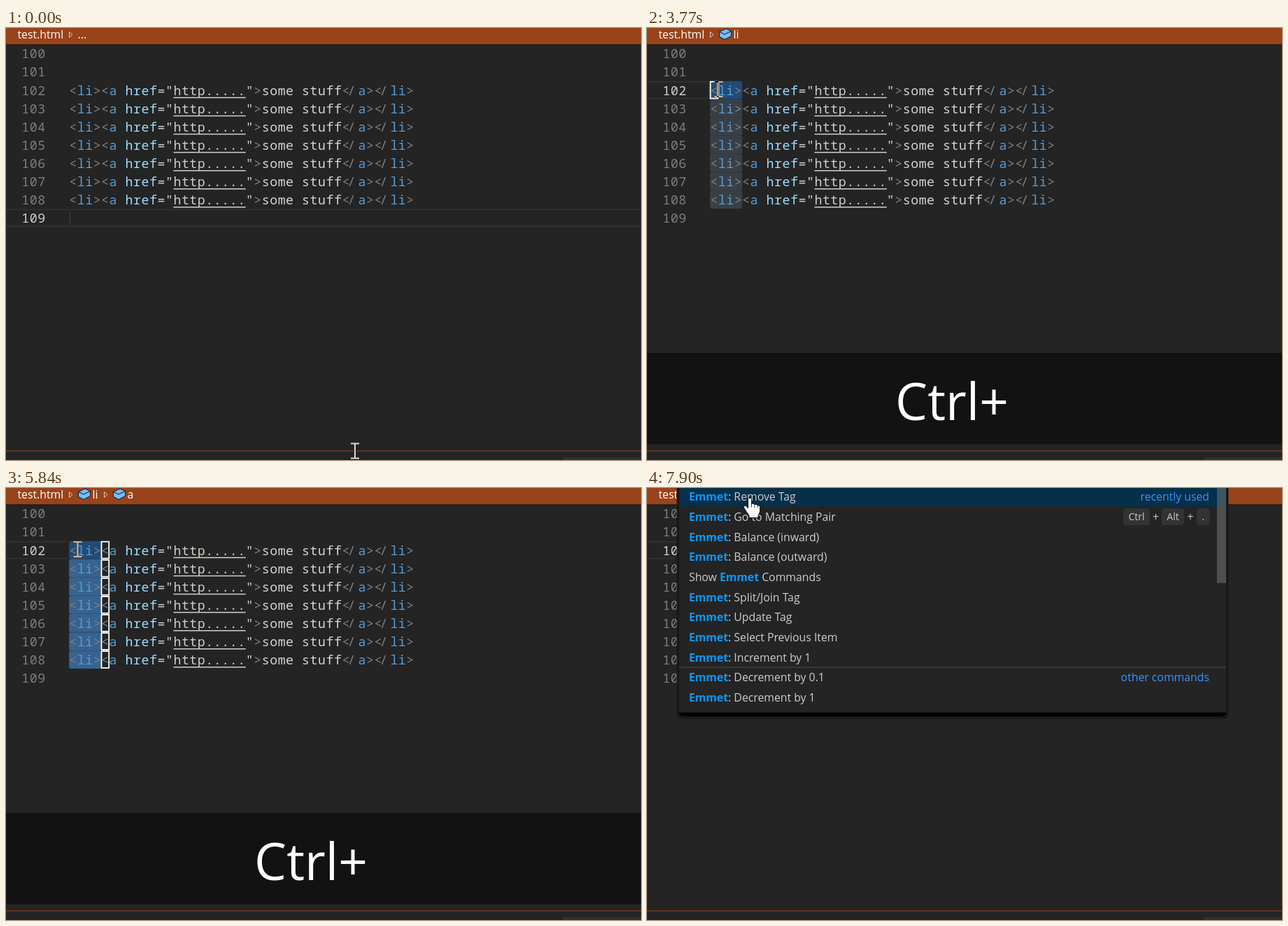
These frames come from a looping animation (908x617 px, 8000 ms). An HTML page:

```html
<!DOCTYPE html>
<html lang="en">
<head>
<meta charset="utf-8">
<title>Editor: multi-select and remove tag</title>
<style>
html, body { margin: 0; width: 100%; height: 100%; overflow: hidden; background: #242424; }
svg { display: block; width: 908px; height: 617px; }
text { white-space: pre; }
.ui { font: 15.8px "Open Sans", "Noto Sans", sans-serif; fill: #ccc; }
.ui .hit { font-weight: 700; fill: #0c97f8; }
.ui .note { fill: #3794ff; }
.crumb { fill: #fff; }
.code { font: 18.3px "Noto Sans Mono", "DejaVu Sans Mono", monospace; letter-spacing: .5px; }
.keys { font: 73px "Open Sans", "Noto Sans", sans-serif; fill: #fff; }
.cap { font-size: 14px; }
#beam { mix-blend-mode: difference; }
</style>
</head>
<body>
<svg id="stage" viewBox="0 0 908 617" xmlns="http://www.w3.org/2000/svg"></svg>
<script>
const LOOP = 8000, CW = 11.48, LH = 26.07, LEFT = 90.2;
const stage = document.getElementById('stage');

function add(tag, attrs, parent = stage, text) {
  const el = document.createElementNS('http://www.w3.org/2000/svg', tag);
  for (const k in attrs) el.setAttribute(k, attrs[k]);
  if (text !== undefined) el.textContent = text;
  parent.append(el);
  return el;
}
const group = (attrs = {}, parent) => add('g', attrs, parent);
const box = (x, y, width, height, fill, parent, more) =>
  add('rect', { x, y, width, height, fill, ...more }, parent);
const show = (el, on) => el.setAttribute('visibility', on ? 'visible' : 'hidden');
const rowY = n => 75.5 + LH * (n - 102);
const colX = c => LEFT + CW * c;

function cells(n, from, to, fill, parent) {
  box(colX(from), rowY(n) + .3, CW * (to - from), LH - .3, fill, parent, { rx: 2.5 });
}
function caret(n, col, parent) {
  box(colX(col) + .4, rowY(n) + 1.2, CW - .8, LH - 2.2, 'none', parent,
    { stroke: '#fff', 'stroke-width': 1.8 });
}
function lineBorder(n, width) {
  const g = group();
  box(0, rowY(n) + .4, width, 2, '#303030', g);
  box(0, rowY(n) + LH - 2, width, 2, '#303030', g);
  return g;
}

// ---- editor ----
box(0, 0, 908, 617, '#242424');
const fullLine = lineBorder(109, 908);
box(91, rowY(109) + 3, 1, LH - 5, '#404040', fullLine);
const clickLine = lineBorder(102, 908);
const gutterLine = lineBorder(102, 88);

const partSel = group(), fullSel = group(), multiSel = group();
const partHits = group(), fullHits = group();
for (let n = 102; n <= 108; n++) {
  const first = n === 102;
  cells(n, 1, 4, first ? '#214c76' : '#3a3f47', first ? partSel : partHits);
  cells(n, 40, 43, '#3a3f47', partHits);
  cells(n, 0, 4, first ? '#214c76' : '#3a3f47', first ? fullSel : fullHits);
  cells(n, 0, 4, first ? '#214c76' : '#38628f', multiSel);
}

const GRAY = '#808080', BLUE = '#569cd6', TEXT = '#d4d4d4';
// text, column, colour, x shift
const TOKENS = [
  ['<', 0, GRAY], ['li', 1, BLUE], ['>', 3, GRAY], ['<', 4, GRAY], ['a', 5, BLUE],
  ['href', 7, '#9cdcfe'], ['="', 11, TEXT], ['http.....', 13, '#ceccc4'], ['"', 22, TEXT],
  ['>', 23, GRAY], ['some stuff', 24, TEXT], ['<', 34, GRAY], ['/', 35, GRAY, -3.5],
  ['a', 36, BLUE], ['>', 37, GRAY], ['<', 38, GRAY], ['/', 39, GRAY, -3.5],
  ['li', 40, BLUE], ['>', 42, GRAY]
];
const nums = {};
for (let n = 100; n <= 109; n++) {
  const y = rowY(n) + 20;
  nums[n] = add('text', { x: 22.3, y, class: 'code' }, stage, n);
  if (n < 102 || n > 108) continue;
  for (const [s, col, fill, shift = 0] of TOKENS)
    add('text', { x: colX(col) + shift, y, fill, class: 'code' }, stage, s);
  box(colX(13), rowY(n) + 23.2, CW * 9, 1.5, '#d0d0cc');
}

const clickCaret = group(), partCaret = group(), fullCaret = group(), multiCaret = group();
caret(102, 4, clickCaret);
caret(102, 1, partCaret);
caret(102, 0, fullCaret);
for (let n = 102; n <= 108; n++) caret(n, 4, multiCaret);

// ---- breadcrumb bar ----
box(0, 23, 908, 2, '#1b1b1b');
box(0, 0, 908, 23.3, '#99431a');
const crumb = (x, s, parent) => add('text', { x, y: 15.3, class: 'ui crumb' }, parent, s);
const arrow = (x, parent) => add('path', {
  d: `M${x} 5.5l4.5 4-4.5 4z`, fill: 'none', stroke: '#e3cabd', 'stroke-width': 1
}, parent);
function cube(x, parent) {
  const g = group({ transform: `translate(${x} 0)`, 'stroke-linejoin': 'round' }, parent);
  add('path', { d: 'M.5 5.5L10 1l7.5 3.5v7L8 16.5.5 12.5z', fill: '#75beff', stroke: '#1d2c3a', 'stroke-width': 1.2 }, g);
  add('path', { d: 'M.5 5.5L8 9l9.5-4.5', fill: 'none', stroke: '#1d2c3a', 'stroke-width': 1.2 }, g);
}
crumb(16.5, 'test.html');
arrow(90.5);
const dots = crumb(102.5, '...');
const liCrumb = group(), aCrumb = group();
cube(103, liCrumb);
crumb(123.5, 'li', liCrumb);
arrow(140.5, aCrumb);
cube(153, aCrumb);
crumb(173.5, 'a', aCrumb);

// ---- panel edge ----
box(0, 603.3, 908, 1.4, '#7a3517');
box(796, 613, 112, 4, '#303030');

// ---- command palette ----
const ROW = 28.67, ROWS = [
  'Remove Tag', 'Go to Matching Pair', 'Balance (inward)', 'Balance (outward)', '',
  'Split/Join Tag', 'Update Tag', 'Select Previous Item', 'Increment by 1',
  'Decrement by 0.1', 'Decrement by 1'
];
const palette = group();
box(42.5, -12, 789, 342, '#181818', palette, { rx: 8 });
box(46, -12, 782, 338, '#000', palette, { rx: 5 });
box(46, 0, 782, 320.6, '#242424', palette);
box(46, 0, 782, 26.5, '#062f4a', palette);
const hover = box(46, 0, 769, ROW, '#000', palette);
box(46, 255.5, 782, 1.2, '#47474d', palette);
box(815, 0, 13, 135.7, '#797979', palette, { opacity: .5 });

const labels = ROWS.map((name, i) => {
  const t = add('text', { x: 60, y: 18.4 + ROW * i, class: 'ui' }, palette);
  const bit = (s, cls = '') => add('tspan', { class: cls }, t, s);
  if (!name) bit('Show ');
  bit('Emmet', 'hit');
  bit(name ? ': ' + name : ' Commands');
  return t;
});
function note(row, s) {
  const t = add('text', { x: 804, y: 18.4 + ROW * row, class: 'ui', 'text-anchor': 'end' }, palette);
  add('tspan', { class: 'note' }, t, s);
}
note(0, 'recently used');
note(9, 'other commands');

const mid = (x, y, s, cls, parent) =>
  add('text', { x, y, class: cls, 'text-anchor': 'middle' }, parent, s);
for (const [x, w, s] of [[681, 38, 'Ctrl'], [736, 32, 'Alt'], [786, 18.5, '.']]) {
  box(x, 29, w, 24, '#333', palette, { rx: 4 });
  mid(x + w / 2, 46, s, 'ui cap', palette);
}
mid(727.5, 47, '+', 'ui', palette);
mid(777, 47, '+', 'ui', palette);

// ---- key display ----
const keyBar = group();
box(0, 464, 908, 130.5, '#121212', keyBar);
const keyText = mid(436, 560, '', 'keys', keyBar);

// ---- pointers ----
const beam = add('path', {
  id: 'beam', d: 'M-6-10.5h12M0-10.5v21M-6 10.5h12', fill: 'none', stroke: '#fff', 'stroke-width': 2
});
const hand = group();
add('path', {
  d: 'M-2.5 2.5C-2.5-.5 2.5-.5 2.5 2.5V9C4 7.5 6.5 8 6.8 10c1.5-1.2 3.800-.6 4.2 1.2' +
    ' 1.8-.8 3.5.2 3.5 2.3v5c0 3-2 5-2.5 7v3H-1v-3c-1-2.5-4-5-5.5-8.5-1.5-2-3-4-1.5-5.2' +
    ' 2-1.3 4 .7 5.5 3.2z',
  fill: '#fff', stroke: '#111', 'stroke-width': 1
}, hand);
add('path', { d: 'M2.5 9v4.5M6.8 10.5v3.5M11 11.5v3', stroke: '#222', 'stroke-width': .9 }, hand);

// ---- timeline ----
const BEAM = [[0, 499, 604], [330, 280, 178], [680, 165, 82], [1010, 144, 83], [1360, 138.5, 89.5],
  [2050, 102, 93], [2400, 90, 95], [2730, 85.5, 95], [3080, 102.5, 87.5]];
const HAND = [[0, 102, 86.5], [7560, 121, 72], [7900, 147, 14]];
const KEYS = [[0, ''], [3770, 'Ctrl+'], [4110, 'Ctrl+Shift+'], [4460, 'Ctrl+Shift+L'], [5490, ''],
  [5840, 'Ctrl+'], [6200, 'Ctrl+Shift+'], [6540, 'Ctrl+Shift+P'], [7230, '']];
const HOVER = [[0, 3], [7560, 2], [7900, -1]];

const at = (steps, t) => steps.filter(s => s[0] <= t).pop().slice(1);
const place = (el, [x, y]) => el.setAttribute('transform', `translate(${x} ${y})`);

function draw(t) {
  const during = (el, from, to = LOOP) => show(el, t >= from && t < to);
  during(fullLine, 0, 1700);
  during(clickLine, 1700, 2050);
  during(clickCaret, 1700, 2050);
  during(gutterLine, 2050);
  during(partSel, 2050, 2400);
  during(partCaret, 2050, 2400);
  during(partHits, 2050, 2730);
  during(fullSel, 2400, 4460);
  during(fullCaret, 2400, 4460);
  during(fullHits, 2730, 4460);
  during(multiSel, 4460);
  during(multiCaret, 4460);
  during(dots, 0, 2050);
  during(liCrumb, 2050);
  show(aCrumb, (t >= 2050 && t < 2400) || t >= 4800);
  const active = t < 1700 ? 109 : 102;
  for (const n in nums) nums[n].setAttribute('fill', +n === active ? '#cfcfcf' : '#7d7d7d');

  const picking = t >= 6540;
  palette.setAttribute('display', picking ? 'inline' : 'none');
  const [row] = at(HOVER, t);
  show(hover, picking && row >= 0);
  hover.setAttribute('y', 13 + ROW * (row - .5));
  labels.forEach((el, i) => el.style.fill = i === row ? '#fff' : '');

  const [keys] = at(KEYS, t);
  show(keyBar, keys !== '');
  keyText.textContent = keys;

  show(beam, !picking);
  show(hand, picking);
  place(beam, at(BEAM, t));
  place(hand, at(HAND, t));
}

const start = performance.now();
function tick() {
  draw((performance.now() - start) % LOOP);
  requestAnimationFrame(tick);
}
tick();
</script>
</body>
</html>
```
